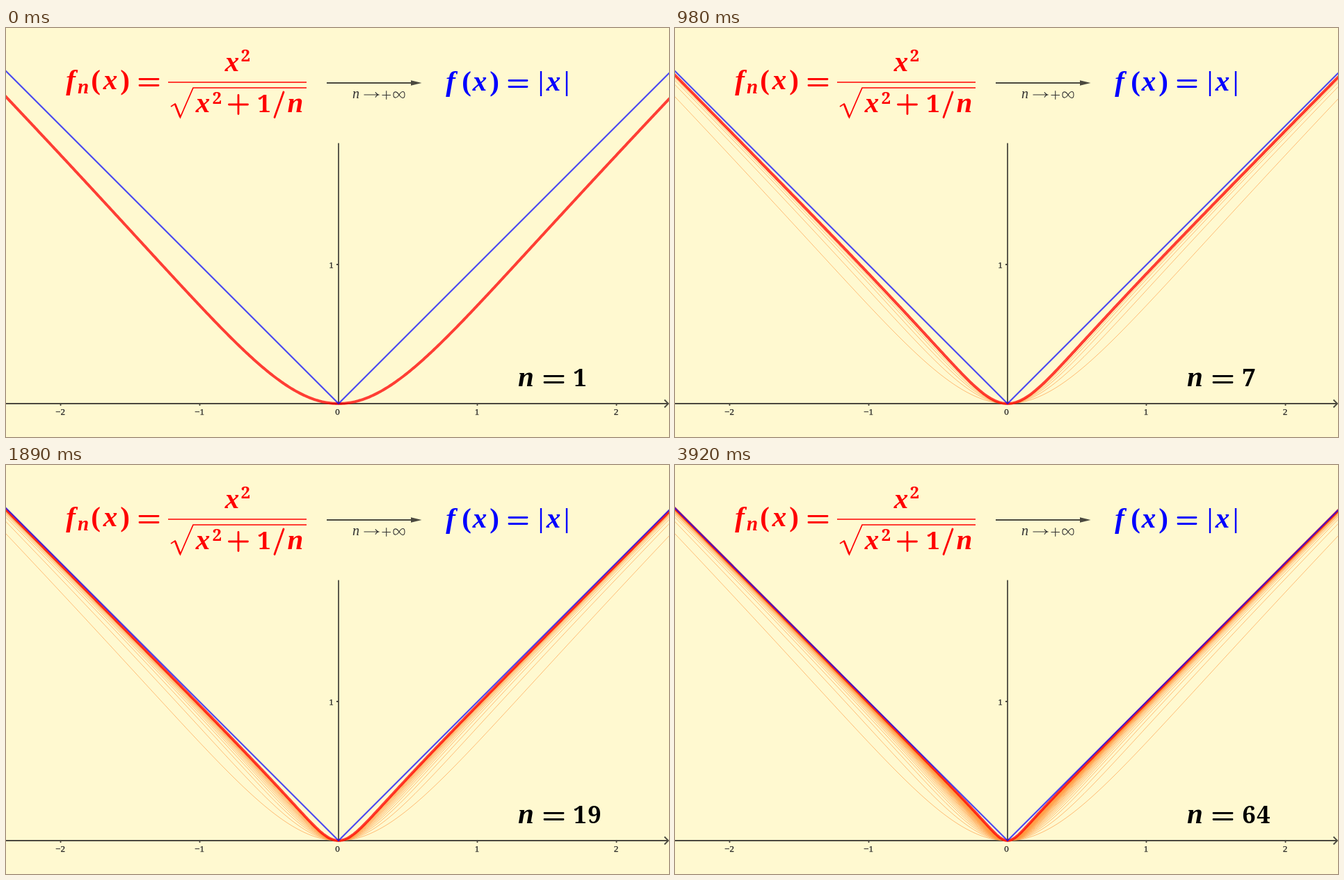
Recreate the animation shown at these times as an HTML page. Size 953 px wide and 588 px high, loop 3.99 s.

```html
<!DOCTYPE html>
<html lang="en">
<head>
<meta charset="utf-8">
<title>Convergence to |x|</title>
<style>
  html, body { margin: 0; width: 100%; height: 100%; overflow: hidden; background: #fff9d0; }
  svg { display: block; }
  path { fill: none; }
  text { text-anchor: middle; font-family: "Liberation Serif", serif; }
  .math { font-weight: bold; }
  .var { font-size: 41px; font-style: italic; }
  .sub { font-size: 29px; font-style: italic; }
  .num { font: bold 34.5px "Noto Serif", serif; }
  .sup { font: bold 24px "Noto Serif", serif; }
  .paren { font-size: 41px; }
  .sign { stroke-width: 2.8; stroke-linecap: round; }
  .rule { stroke-width: 1.7; }
  .red { fill: #f00; stroke: none; }
  .red path { stroke: #f00; }
  .blue { fill: #00f; }
  .blue path { stroke: #00f; }
  .axes path { stroke: #4b493f; stroke-width: 1.8; }
  .ticks { fill: #222; font-size: 13px; stroke: #222; stroke-width: .25; }
  .limit { fill: #333; font-size: 20px; }
  .limit path { stroke: #333; stroke-width: 1.1; }
  #traces path { stroke: #ff963c; stroke-opacity: .62; stroke-width: 1; }
  #curve { stroke: #f00; stroke-opacity: .75; stroke-width: 4; }
  #abs { stroke: #00f; stroke-opacity: .7; stroke-width: 2.2; }
</style>
</head>
<body>
<svg width="953" height="588" viewBox="0 0 953 588">
  <g class="axes">
    <path d="M0 540H952M478 165.500V540M946.500 534.500L952 540L946.500 545.500"/>
    <path d="M78.500 540v3M278.500 540v3M677.500 540v3M877.500 540v3M475 340h3"/>
  </g>
  <g class="ticks">
    <text x="78" y="556">−2</text>
    <text x="278" y="556">−1</text>
    <text x="476.500" y="556">0</text>
    <text x="677" y="556">1</text>
    <text x="877" y="556">2</text>
    <text x="467.500" y="344.500">1</text>
  </g>

  <g id="traces"></g>
  <path id="curve"/>
  <path id="abs"/>

  <g class="math red">
    <text class="var" x="93" y="88">f</text>
    <text class="sub" x="111" y="94">n</text>
    <text class="paren" x="129" y="88">(</text>
    <text class="var" x="150" y="88">x</text>
    <text class="paren" x="171" y="88">)</text>
    <path class="sign" d="M192 73.500h27M192 82.500h27"/>
    <path class="rule" d="M233 78H432"/>
    <text class="var" x="325" y="62">x</text>
    <text class="sup" x="344.500" y="48">2</text>
    <path class="rule" d="M237 113L243 109L250.500 128.500L269 86H432"/>
    <path class="sign" d="M243.500 110.500L250 127"/>
    <text class="var" x="283" y="121">x</text>
    <text class="sup" x="303.500" y="109">2</text>
    <path class="sign" d="M320.500 110h27M334 96.500v27"/>
    <text class="num" x="371" y="121">1</text>
    <path class="sign" d="M399 92L386 128.500"/>
    <text class="var" x="416" y="121">n</text>
  </g>

  <path d="M461 79H586" stroke="#4b493f" stroke-width="2"/>
  <path d="M582 75.300L597.500 79L582 82.700Z" style="fill:#4b493f"/>
  <g class="limit">
    <text x="503" y="101" font-style="italic">n</text>
    <path d="M514.500 96H535M531 92.300Q532 95 535.500 96Q532 97 531 99.700"/>
    <path d="M540.500 96.500h12.500M546.750 90.250v12.500"/>
    <path d="M565 96C561 90 557 91 557 96S561 102 565 96S573 90 573 96S569 102 565 96Z"/>
  </g>

  <g class="math blue">
    <text class="var" x="639" y="90">f</text>
    <text class="paren" x="662" y="90">(</text>
    <text class="var" x="681" y="90">x</text>
    <text class="paren" x="702" y="90">)</text>
    <path class="sign" d="M723 75.500h26M723 84.500h26"/>
    <path d="M769 62V98M806 62V98" stroke-width="2.4"/>
    <text class="var" x="787" y="90">x</text>
  </g>

  <g class="math">
    <text class="var" x="747.500" y="515">n</text>
    <path class="sign" stroke="#000" d="M774 500.500h27M774 509.500h27"/>
    <text class="num" id="tens" x="825" y="515"></text>
    <text class="num" id="ones" x="846" y="515"></text>
  </g>
</svg>
<script>
  const STEP = 70, STEPS = 57;
  const OX = 478, OY = 540, UNIT = 199.7;
  const $ = id => document.getElementById(id);

  function plot(f) {
    const pts = [];
    for (let px = -2; px <= 956; px += 2) {
      const x = (px - OX) / UNIT;
      pts.push(px + " " + (OY - UNIT * f(x)).toFixed(2));
    }
    return "M" + pts.join("L");
  }

  const countAt = k => Math.floor((1 + k / 8) ** 2);
  const curveFor = n => plot(x => x * x / Math.sqrt(x * x + 1 / n));

  $("abs").setAttribute("d", plot(Math.abs));

  // One faint trace for each value the counter passes through
  const values = [...new Set(Array.from({ length: STEPS }, (_, k) => countAt(k)))];
  const traces = values.map(n => {
    const path = document.createElementNS("http://www.w3.org/2000/svg", "path");
    path.setAttribute("d", curveFor(n));
    $("traces").append(path);
    return { n, path };
  });

  let shown = 0;
  function draw() {
    const n = countAt(Math.floor(performance.now() / STEP) % STEPS);
    if (n !== shown) {
      shown = n;
      $("curve").setAttribute("d", curveFor(n));
      for (const t of traces) t.path.style.display = t.n < n ? "" : "none";
      const digits = String(n);
      $("tens").textContent = digits[0];
      $("ones").textContent = digits[1] || "";
    }
    requestAnimationFrame(draw);
  }
  draw();
</script>
</body>
</html>
```
